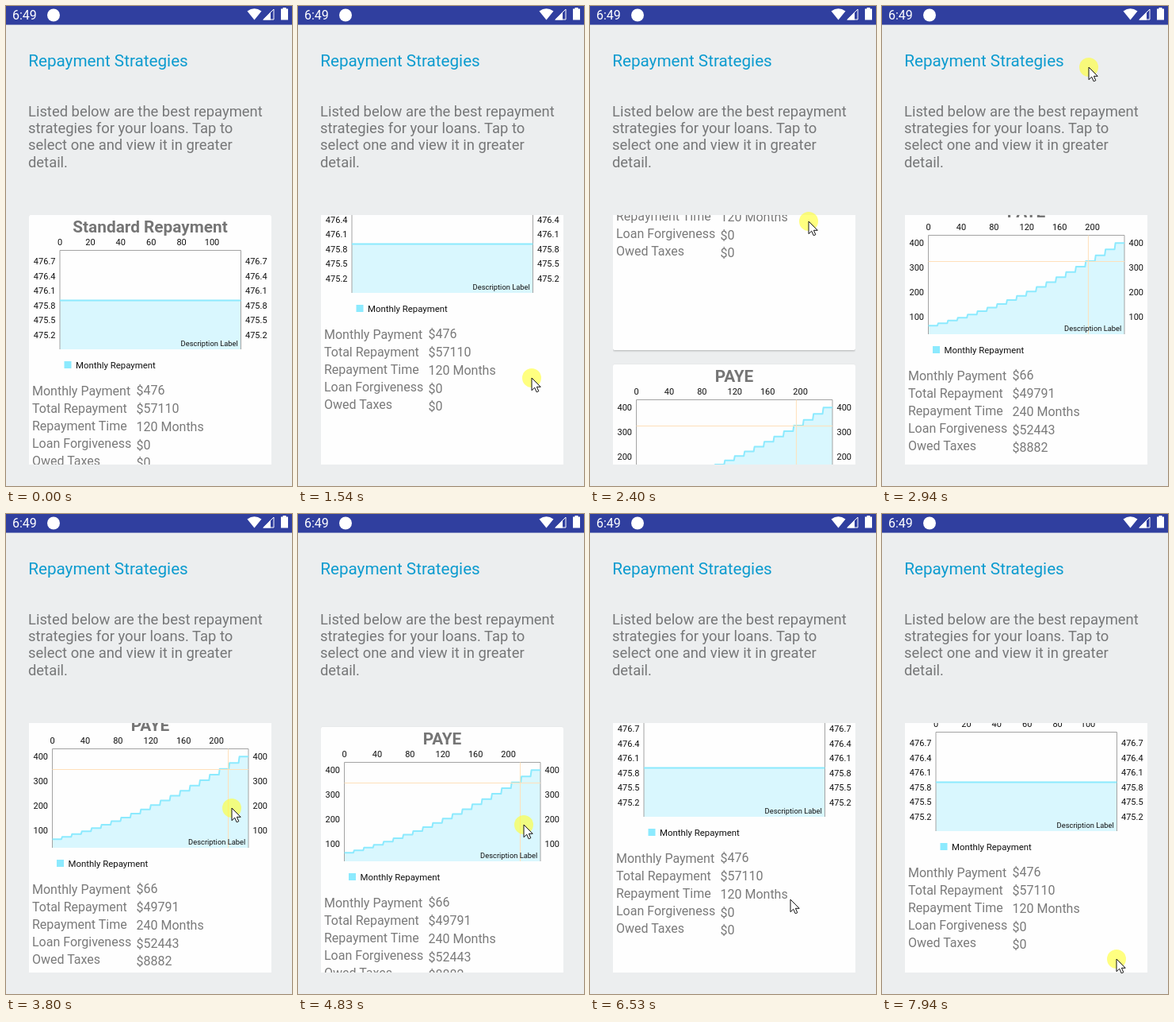
An HTML page that plays this animation: 361x604 px, repeating every 8000 ms.

```html
<!DOCTYPE html>
<html lang="en">
<head>
<meta charset="utf-8">
<title>Repayment Strategies</title>
<style>
  html, body { margin: 0; width: 100%; height: 100%; overflow: hidden; background: #eceeef; }
  svg { display: block; font-family: Roboto, sans-serif; }
  .heading { font-size: 20.7px; fill: #0c9bcf; }
  .intro { font-size: 18.4px; fill: #767778; }
  .name { font-size: 20.8px; font-weight: 700; fill: #757575; text-anchor: middle; }
  .row { font-size: 16px; fill: #7a7a7a; }
  .axis { font-size: 11px; fill: #111; }
  .legend { font-size: 11.4px; fill: #111; }
  .note { font-size: 9.35px; fill: #111; text-anchor: end; }
  .mid { text-anchor: middle; }
  .end { text-anchor: end; }
  .card { fill: #fefefe; filter: drop-shadow(0 1px 1px rgba(0, 0, 0, .25)); }
  .frame { fill: none; stroke: #a3a3a3; }
  .area { fill: #d9f7fe; }
  .curve { fill: none; stroke: #8ceafe; stroke-width: 2; stroke-linejoin: round; }
  .cross { fill: none; stroke: #ffe0ba; }
</style>
</head>
<body>
<svg width="361" height="604" viewBox="0 0 361 604">
  <clipPath id="view"><rect x="29" y="263" width="306" height="314"/></clipPath>
  <rect width="361" height="604" fill="#eceeef"/>

  <rect width="361" height="23.600" fill="#303f9f"/>
  <g fill="#fff">
    <text x="8" y="16.700" font-size="16">6:49</text>
    <circle cx="60" cy="11.500" r="8"/>
    <path d="M304.500 6.500Q313.500 0 322.500 6.500L313.500 17.500Z"/>
    <path d="M334 7.500V17.500H324Z"/>
    <path d="M338 4V17H325Z" fill="none" stroke="#fff"/>
    <path d="M349.500 2H353.500V3.500H356V17.500H347V3.500H349.500Z"/>
  </g>

  <text class="heading" x="28.200" y="76">Repayment Strategies</text>
  <g id="intro" class="intro"></g>
  <g clip-path="url(#view)"><g id="list"></g></g>

  <g id="cursor">
    <circle id="press" r="12" fill="#ffff32" fill-opacity=".62"/>
    <path d="M0 0V15.700L3.700 12.200L6.200 17.800L8.800 16.700L6.400 11.300H11.200Z" fill="#fff" stroke="#111"/>
  </g>
</svg>
<script>
const NS = 'http://www.w3.org/2000/svg';
const $ = id => document.getElementById(id);

function add(parent, tag, attrs, content) {
  const node = document.createElementNS(NS, tag);
  for (const key in attrs) node.setAttribute(key, attrs[key]);
  if (content !== undefined) node.textContent = content;
  parent.append(node);
  return node;
}
const label = (parent, cls, x, y, content) => add(parent, 'text', { class: cls, x, y }, content);

['Listed below are the best repayment', 'strategies for your loans. Tap to',
 'select one and view it in greater', 'detail.']
  .forEach((line, i) => label($('intro'), '', 28, 138.6 + i * 21.3, line));

const PLOT_TOP = 44.5, PLOT_BOTTOM = 169;
const ROWS = ['Monthly Payment', 'Total Repayment', 'Repayment Time', 'Loan Forgiveness', 'Owed Taxes'];

function addCard(y, plan) {
  const g = add($('list'), 'g', { transform: `translate(0 ${y})` });
  const { left, right, months, levels } = plan;
  const xAt = month => left + (right - left) * month / (months - 1);
  add(g, 'rect', { class: 'card', x: 29, y: 0, width: 306, height: 434, rx: 2 });
  label(g, 'name', 182, 22, plan.name);

  // One flat step per year, joined by a one-month rise.
  let line = '';
  for (let m = 0; m < months; m++) line += `${m ? 'L' : ''}${xAt(m)} ${plan.yearY(Math.floor(m / 12))}`;
  add(g, 'path', { class: 'area', d: `M${left} ${PLOT_BOTTOM}L${line}V${PLOT_BOTTOM}Z` });
  add(g, 'path', { class: 'frame', d: `M${left} ${PLOT_BOTTOM}V${PLOT_TOP}H${right}V${PLOT_BOTTOM}` });
  add(g, 'path', { class: 'curve', d: 'M' + line });
  const cross = add(g, 'path', { class: 'cross' });

  for (let i = 0; i < 6; i++) label(g, 'axis mid', xAt(i * plan.tick), 37.7, i * plan.tick);
  for (let i = 0; i < levels.count; i++) {
    const value = (levels.max - i * levels.step).toFixed(levels.digits);
    const levelY = levels.y + i * levels.gap;
    label(g, 'axis end', left - 5.5, levelY, value);
    label(g, 'axis', right + 5.5, levelY, value);
  }
  label(g, 'note', right - 3.7, 165.3, 'Description Label');
  add(g, 'rect', { x: left + 5.5, y: 184, width: 9, height: 9, fill: '#8ceafe' });
  label(g, 'legend', left + 20, 192.7, 'Monthly Repayment');

  ROWS.forEach((row, i) => {
    label(g, 'row', 33, 226.5 + i * 22.2, row);
    label(g, 'row', 164.5, 226.2 + i * 22.8, plan.values[i]);
  });

  return month => cross.setAttribute('d', `M${left} ${Math.round(plan.yearY(Math.floor(month / 12))) + .5}`
    + `H${right}M${xAt(month)} ${PLOT_TOP}V${PLOT_BOTTOM}`);
}

addCard(263, {
  name: 'Standard Repayment', left: 68, right: 296.5, months: 120, tick: 20,
  yearY: () => 107.5,
  levels: { max: 476.7, step: .3, digits: 1, count: 6, y: 62.2, gap: 18.55 },
  values: ['$476', '$57110', '120 Months', '$0', '$0']
});

const markMonth = addCard(715, {
  name: 'PAYE', left: 58.5, right: 306, months: 240, tick: 40,
  yearY: year => 158.3 - 3 * year - .13 * year * year,
  levels: { max: 400, step: 100, digits: 0, count: 4, y: 57.5, gap: 31 },
  values: ['$66', '$49791', '240 Months', '$52443', '$8882']
});

// Each gesture leads from the previous resting place to its own.
const HIDDEN = { start: 0, end: 0, x: 333, y: 590, scroll: 0 };
const GESTURES = [
  { start: 690, end: 910, x: 303, y: 557, scroll: 0 },
  { start: 1160, end: 2400, x: 276, y: 271, scroll: 264, drag: true },
  { start: 2400, end: 2940, x: 261, y: 77, scroll: 471, drag: true },
  { start: 3190, end: 3720, x: 285, y: 360, scroll: 471 },
  { start: 3720, end: 3950, x: 285, y: 391, scroll: 447, drag: true },
  { start: 4830, end: 5610, x: 272, y: 590, scroll: 245, drag: true },
  { start: 5610, end: 5990, x: 262, y: 440, scroll: 98 },
  { start: 6370, end: 6530, x: 253, y: 485, scroll: 51, drag: true },
  { start: 6530, end: 7230, x: 297, y: 588, scroll: 0 },
  { start: 7460, end: 7940, x: 296, y: 560, scroll: 33, drag: true }
];
const LOOP = 8000, STEP = 77;

const mix = (a, b, k) => Math.round(a + (b - a) * k);
const smooth = k => k * k * (3 - 2 * k);
const lag = k => k ** 1.13;

function progress({ start, end }, t) {
  const steps = Math.round((end - start) / STEP);
  return Math.min(1, Math.floor((t - start) / (end - start) * steps + .2) / steps);
}

function draw(t) {
  const index = GESTURES.findLastIndex(g => g.start <= t);
  const to = GESTURES[index] ?? HIDDEN, from = GESTURES[index - 1] ?? HIDDEN;
  const k = index < 0 ? 1 : progress(to, t);
  const move = to.drag ? k : smooth(k);
  const x = mix(from.x, to.x, move), y = mix(from.y, to.y, move);
  const scroll = mix(from.scroll, to.scroll, to.drag ? lag(k) : move);

  $('list').setAttribute('transform', `translate(0 ${-scroll})`);
  $('cursor').setAttribute('transform', `translate(${x} ${y})`);
  $('cursor').setAttribute('visibility', index < 0 ? 'hidden' : 'visible');
  $('press').setAttribute('opacity', to.drag ? 1 : 0);
  markMonth(t < 3720 ? 195 : 214.4);
}

const began = performance.now();
function tick() {
  draw((performance.now() - began) % LOOP);
  requestAnimationFrame(tick);
}
tick();
</script>
</body>
</html>
```
